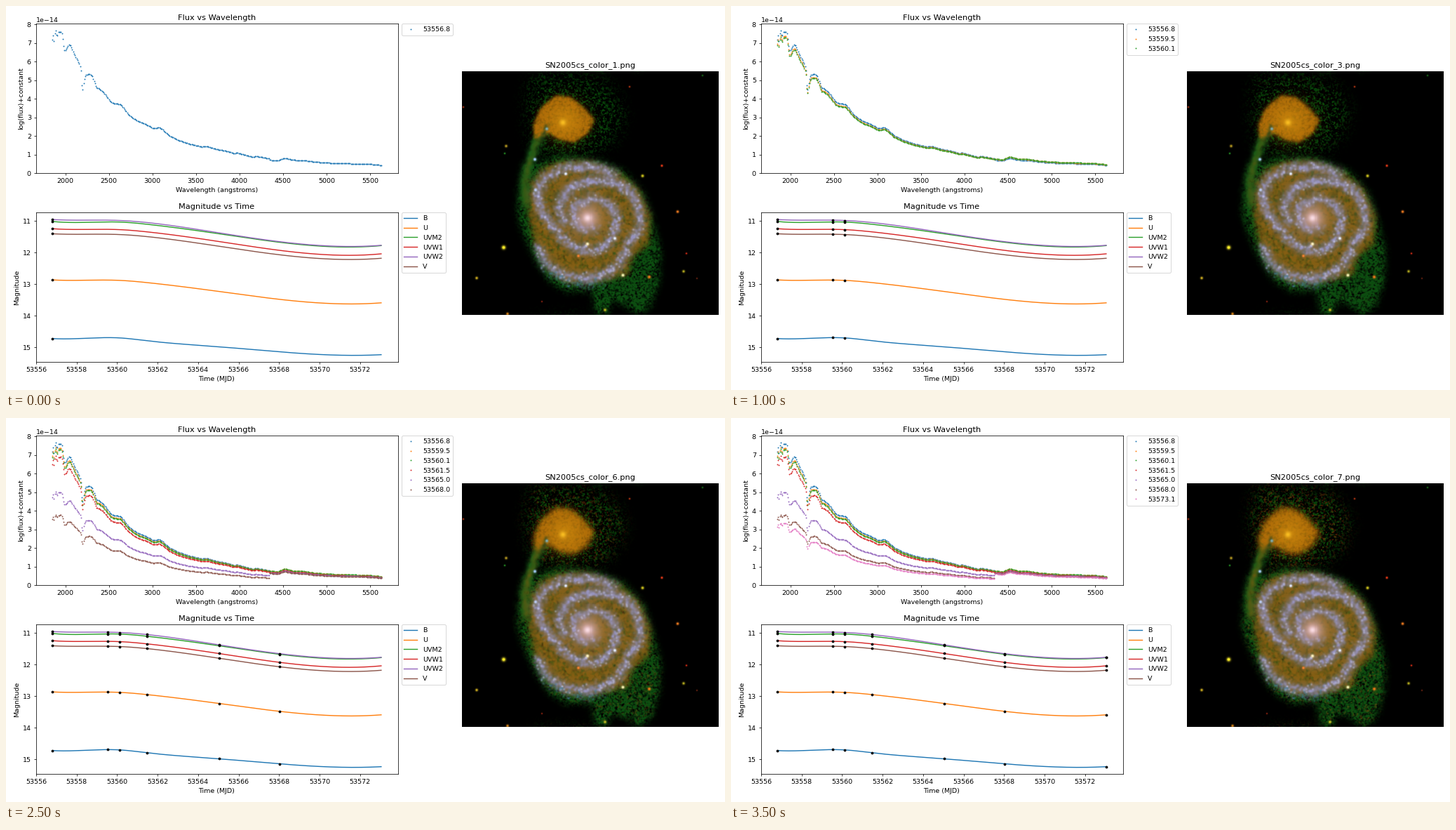
A matplotlib script for the animation above (4000 ms loop, 1025 by 547 pixels).

```python
import numpy as np
import matplotlib.pyplot as plt
from matplotlib.animation import FuncAnimation
from matplotlib.path import Path

W, H, DPI = 1025, 547, 1025 / 15
plt.rcParams["font.family"] = "DejaVu Sans"
fig = plt.figure(figsize=((W + 0.01) / DPI, (H + 0.01) / DPI), dpi=DPI, facecolor="white")


def add_axes(x0, y0, x1, y1):
    return fig.add_axes([x0 / W, 1 - y1 / H, (x1 - x0) / W, (y1 - y0) / H])


# ---------- data ----------
EPOCHS = np.array([53556.8, 53559.53, 53560.14, 53561.48, 53565.03, 53568.03, 53573.05])
COLORS = [f"C{i}" for i in range(7)]

KNOT_WL = [1850, 1860, 1870, 1880, 1890, 1900, 1907, 1920, 1955, 1965, 1980, 1992, 2012,
           2035, 2060, 2093, 2125, 2165, 2181, 2191, 2201, 2213, 2229, 2240, 2286, 2310,
           2334, 2358, 2390, 2431, 2479, 2520, 2560, 2632, 2664, 2720, 2770, 2833, 2914,
           2962, 3010, 3083, 3115, 3187, 3290, 3412, 3570, 3630, 3735, 3855, 3936, 3976,
           4080, 4153, 4193, 4345, 4350, 4440, 4515, 4620, 4740, 4860, 5007, 5225, 5385,
           5520, 5630]
KNOT_FLUX = [7.17, 7.4, 7.1, 7.5, 7.65, 7.45, 7.33, 7.58, 7.6, 7.4, 6.85, 6.55, 6.68,
             6.9, 6.88, 6.5, 6.2, 5.85, 5.5, 4.65, 4.48, 4.95, 5.2, 5.3, 5.33, 5.2,
             4.9, 4.6, 4.55, 4.4, 4.1, 3.85, 3.74, 3.72, 3.55, 3.2, 3.0, 2.8, 2.65,
             2.55, 2.42, 2.46, 2.36, 2.05, 1.8, 1.6, 1.43, 1.45, 1.3, 1.2, 1.08, 1.1,
             0.97, 0.88, 0.92, 0.8, 0.72, 0.68, 0.83, 0.72, 0.7, 0.62, 0.57, 0.53, 0.52,
             0.49, 0.44]
UV_SCALE = [1, 0.968, 0.958, 0.907, 0.657, 0.496, 0.438]
OPT_SCALE = [1, 1.07, 1.08, 0.99, 0.94, 0.9, 0.86]

MAGS = {
    "B": [14.72, 14.69, 14.70, 14.79, 14.98, 15.14, 15.23],
    "U": [12.865, 12.87, 12.88, 12.95, 13.23, 13.48, 13.59],
    "UVM2": [11.015, 11.03, 11.035, 11.105, 11.405, 11.675, 11.78],
    "UVW1": [11.245, 11.265, 11.275, 11.345, 11.65, 11.93, 12.04],
    "UVW2": [10.955, 10.975, 10.985, 11.05, 11.375, 11.655, 11.77],
    "V": [11.405, 11.42, 11.43, 11.495, 11.80, 12.07, 12.18],
}


def cubic_spline(x, y, xs):
    """Not-a-knot spline through the points, on a truncated power basis."""
    def basis(t):
        u = (t - x[0]) / 10
        k = (x[2:-2] - x[0]) / 10
        return np.column_stack([u ** p for p in range(4)]
                               + [np.clip(u - c, 0, None) ** 3 for c in k])
    return basis(xs) @ np.linalg.solve(basis(x), y)


# ---------- galaxy picture ----------
GX, GY, GW, GH = 650, 93, 365, 347
COL, ROW = np.meshgrid(np.arange(GW) + GX + 0.5, np.arange(GH) + GY + 0.5)

HALO = [(748, 100), (820, 98), (858, 112), (882, 150), (868, 190), (835, 215), (790, 218),
        (752, 208), (742, 150)]
OUTER = [(752, 226), (790, 214), (840, 220), (880, 236), (908, 268), (922, 310), (932, 350),
         (930, 390), (918, 428), (900, 440), (880, 425), (862, 420), (856, 440), (840, 440),
         (836, 405), (800, 407), (775, 392), (755, 362), (738, 325), (729, 295), (733, 255),
         (739, 222)]
DISC = [(790, 223), (830, 222), (870, 238), (900, 262), (917, 300), (914, 340), (892, 355),
        (885, 382), (850, 391), (800, 393), (772, 372), (753, 335), (746, 295), (748, 255),
        (766, 232)]
COMPANION = [(785, 128), (805, 131), (824, 146), (838, 163), (830, 182), (810, 195),
             (790, 191), (774, 182), (764, 187), (753, 190), (752, 170), (760, 150),
             (772, 138)]
STREAM = [(768, 168), (757, 195), (747, 222), (740, 250), (741, 285)]
ARM_A = [(870, 243), (835, 229), (800, 231), (770, 245), (756, 268), (764, 292), (780, 315),
         (800, 338), (828, 350), (850, 346), (866, 325), (871, 300), (858, 280), (835, 274),
         (812, 283), (808, 302), (820, 318), (840, 316)]
ARM_B = [(757, 340), (768, 365), (795, 384), (830, 389), (860, 378), (878, 360), (888, 335),
         (903, 318), (902, 287), (885, 262), (860, 250), (830, 250), (800, 262), (787, 285),
         (797, 312)]
STARS = [  # x, y, radius, colour
    (709.5, 344, 1.9, "#fff02a"), (671, 387.5, 1.3, "#c8a820"), (906.5, 243, 1.4, "#c8be1c"),
    (934, 228.5, 1.1, "#e83a18"), (956.5, 293, 1.3, "#e87820"), (969, 352.5, 0.9, "#c02814"),
    (965, 378, 1.3, "#a8a01c"), (916, 386, 1.5, "#e87818"), (853, 433, 1.4, "#b8b420"),
    (888, 116, 0.9, "#a03010"), (713, 200.5, 1.3, "#b09420"), (711, 211, 0.9, "#208020"),
    (715, 438.5, 1.3, "#d08018"), (652, 145, 0.9, "#902c10"), (764, 421, 0.8, "#802010"),
    (992, 100, 0.9, "#145c14"), (984, 388, 0.8, "#602010"), (816, 356, 1.3, "#f08030"),
    (878.5, 383.5, 1.5, "#f4f0b0"), (754, 219.5, 1.5, "#a0c8f0"), (867, 331, 1.5, "#e4ecff"),
    (829, 339, 1.6, "#fff0c0"), (771, 176, 1.5, "#80a8a8"), (798, 240, 1.5, "#e0e8ff"),
    (811, 202, 0.9, "#307020"), (755, 263, 1.6, "#b8c8f0"),
]
WARMTH = [0, 0.05, 0.1, 0, 1, 0.45, 0.6]


def blur(a, s):
    fy, fx = np.fft.fftfreq(GH)[:, None], np.fft.rfftfreq(GW)
    gain = np.exp(-2 * (np.pi * s) ** 2 * (fx ** 2 + fy ** 2))
    return np.fft.irfft2(np.fft.rfft2(a) * gain, s=a.shape)


def grain(rng, s):
    n = blur(rng.normal(size=(GH, GW)), s)
    return n / n.std()


def area(pts, soft):
    inside = Path(pts).contains_points(np.column_stack([COL.ravel(), ROW.ravel()]))
    return blur(inside.reshape(GH, GW).astype(float), soft)


def trail(rng, pts, n, spread, s):
    """Soft dots scattered along a polyline, scaled to a peak of one."""
    p = np.array(pts, float)
    d = np.r_[0, np.cumsum(np.hypot(*np.diff(p, axis=0).T))]
    t = rng.uniform(0, d[-1], n)
    x, y = (np.interp(t, d, p[:, i]) + rng.normal(0, spread, n) for i in (0, 1))
    dots = np.histogram2d(y, x, bins=(GH, GW), range=[[GY, GY + GH], [GX, GX + GW]])[0]
    a = blur(dots, s)
    return a / a.max()


def glow(x, y, s):
    return np.exp(-((COL - x) ** 2 + (ROW - y) ** 2) / (2 * s * s))


def paint(img, mask, color):
    m = np.clip(mask, 0, 1)[..., None]
    return img + (np.array(color) / 255 - img) * m


def galaxy(k):
    fixed, live = np.random.default_rng(51), np.random.default_rng(100 + k)
    warm = WARMTH[k]
    img = np.zeros((GH, GW, 3))

    halo = area(HALO, 11)
    img = paint(img, halo * np.clip(0.22 + 0.4 * grain(live, 0.8), 0, 1), (8, 70, 10))
    img = paint(img, warm * halo * np.clip(-0.1 + 0.5 * grain(live, 0.8), 0, 1), (125, 48, 8))
    outer = area(OUTER, 5)
    img = paint(img, outer * (0.8 + 0.3 * grain(live, 0.9)), (12, 76, 16))
    img = paint(img, warm * outer * np.clip(-0.1 + 0.4 * grain(live, 0.9), 0, 1), (105, 72, 12))

    img = paint(img, 1.5 * trail(fixed, STREAM, 900, 4.5, 2.2), (18, 88, 22))
    img = paint(img, (0.35 + 0.5 * warm) * trail(fixed, STREAM, 800, 3, 2), (140, 92, 14))
    img = paint(img, area(COMPANION, 2 + 3 * warm) * (0.93 + 0.08 * grain(live, 1)),
                (172, 106, 8))
    img = paint(img, 0.75 * glow(797, 165, 17), (204, 136, 12))
    img = paint(img, 0.9 * glow(794, 167, 3.2), (255, 196, 36))
    img = paint(img, 0.7 * trail(fixed, [(771, 170), (764, 192)], 60, 1.5, 1.6), (28, 62, 24))

    disc = area(DISC, 4)
    img = paint(img, disc * (0.88 + 0.14 * grain(fixed, 1.4)), (132, 94, 18))
    img = paint(img, disc * np.clip(0.25 * grain(fixed, 3), 0, 0.5), (84, 72, 16))
    img = paint(img, 0.7 * glow(829, 302, 20), (160, 118, 62))
    for arm in (ARM_A, ARM_B):
        img = paint(img, 0.75 * trail(fixed, arm, 1800, 5, 4), (118, 112, 112))
        img = paint(img, 1.35 * trail(fixed, arm, 1100, 4, 1.5), (150, 146, 188))
        img = paint(img, 0.75 * trail(fixed, arm, 90, 4, 1.2), (196, 198, 236))
    teal = trail(fixed, [(770, 374), (800, 394), (830, 398), (853, 392)], 70, 4, 1.1)
    img = paint(img, 0.7 * teal, (72, 128, 160))
    img = paint(img, 0.85 * glow(829, 302, 10), (214, 170, 178))
    img = paint(img, 0.9 * glow(829, 302, 3.5), (255, 226, 234))

    for x, y, r, color in STARS:
        img = paint(img, 1.2 * glow(x, y, r), [int(color[i:i + 2], 16) for i in (1, 3, 5)])
    return np.clip(img, 0, 1)


# ---------- axes ----------
flux_ax = add_axes(42.5, 25.5, 558.5, 238.5)
flux_ax.set(title="Flux vs Wavelength", xlabel="Wavelength (angstroms)",
            ylabel="log(flux)+constant", xlim=(1661, 5819), ylim=(0, 8.02e-14),
            xticks=range(2000, 5501, 500), yticks=np.arange(9) * 1e-14)
wl = np.arange(1850, 5631, 10)
base = np.interp(wl, KNOT_WL, KNOT_FLUX) * 1e-14
spectra = []
for epoch, uv, opt, c in zip(EPOCHS, UV_SCALE, OPT_SCALE, COLORS):
    spectra += flux_ax.plot(wl, base * np.where(wl < 4350, uv, opt), "o", ms=1, color=c,
                            label=f"{epoch:.1f}")

mag_ax = add_axes(42.5, 294.5, 558.5, 507.5)
mag_ax.set(title="Magnitude vs Time", xlabel="Time (MJD)", ylabel="Magnitude",
           xlim=(53555.98, 53573.87), ylim=(15.47, 10.74),
           xticks=range(53556, 53573, 2), yticks=range(11, 16))
mag_ax.ticklabel_format(axis="x", useOffset=False, style="plain")
days = np.linspace(EPOCHS[0], EPOCHS[-1], 300)
marks = []
for (band, mags), c in zip(MAGS.items(), COLORS):
    mag_ax.plot(days, cubic_spline(EPOCHS, np.array(mags), days), color=c, label=band)
    marks += mag_ax.plot([], [], "o", ms=3, color="black", zorder=3)

BESIDE = dict(loc="upper left", bbox_to_anchor=(1.01, 1), borderaxespad=0)
mag_ax.legend(**BESIDE)

sky_ax = add_axes(GX, GY, GX + GW, GY + GH)
sky_ax.axis("off")
pictures = [galaxy(k) for k in range(len(EPOCHS))]
sky = sky_ax.imshow(pictures[0], aspect="auto", interpolation="nearest")


def update(i):
    n = min(i + 1, len(EPOCHS))
    for k, line in enumerate(spectra):
        line.set_visible(k < n)
    flux_ax.legend(handles=spectra[:n], **BESIDE)
    for dots, mags in zip(marks, MAGS.values()):
        dots.set_data(EPOCHS[:n], mags[:n])
    sky.set_data(pictures[n - 1])
    sky_ax.set_title(f"SN2005cs_color_{n}.png")
    return []


anim = FuncAnimation(fig, update, frames=8, interval=500, repeat=True, repeat_delay=0)
plt.show()
```
